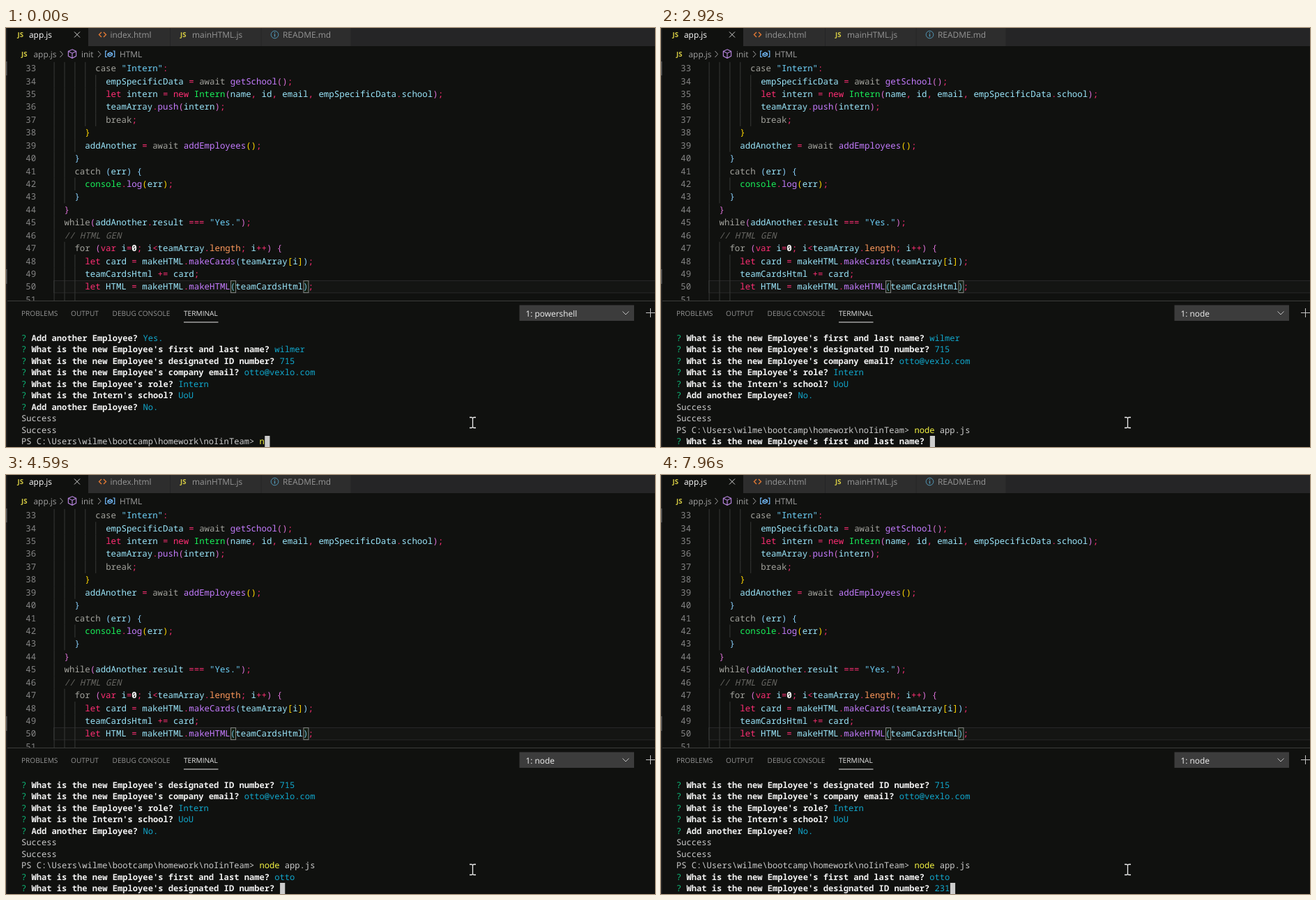
Animation of 931x601 px, one loop 8 s. Source, as an HTML page:

```html
<!DOCTYPE html>
<html lang="en">
<head>
<meta charset="utf-8">
<title>Editor and terminal</title>
<style>
html, body { margin: 0; width: 100%; height: 100%; overflow: hidden; background: #10110f; }
svg { display: block; }
text { white-space: pre; text-rendering: geometricPrecision; font-variant-ligatures: none; }
.code, .term { font-family: "Noto Sans Mono", "DejaVu Sans Mono", monospace; }
.code { font-size: 12.42px; }
.term { font-size: 12.127px; }
.ui { font-family: "Open Sans", "Noto Sans", sans-serif; font-size: 11.9px; }
.panel { font-size: 10.15px; }
.js { font: bold 9.6px "Open Sans", sans-serif; fill: #d5cb43; }
.line { fill: none; stroke-width: 1; }
</style>
</head>
<body>
<svg id="stage" width="931" height="601" viewBox="0 0 931 601">
  <rect width="931" height="601" fill="#10110f"/>

  <!-- tabs -->
  <rect x="118" width="813" height="26" fill="#252526"/>
  <path d="M118 0h117v26h-117zM236 0h129.500v26h-129.500zM366.500 0h128v26h-128z" fill="#2d2d2d"/>
  <path class="line" d="M98 5.500l8 8m0-8l-8 8" stroke="#d0d0d0"/>
  <path class="line" d="M137 6l-3.500 3.500 3.500 3.500m3-7l3.500 3.500-3.500 3.500" stroke="#e37933" style="stroke-width:1.4"/>
  <g fill="none" stroke="#519aba">
    <circle cx="385.500" cy="9.500" r="5.300"/>
    <path d="M385.500 8.500v4m0-6.500v1.300" stroke-width="1.400"/>
  </g>

  <!-- breadcrumbs -->
  <path class="line" d="M77.500 33l4 4.500-4 4.500M132 33l4 4.500-4 4.500" stroke="#a0a0a0"/>
  <path class="line" d="M95 30.800l5.600 2.700v6.800l-5.600 3-5.600-3v-6.800zM89.400 33.500l5.600 2.700 5.600-2.700M95 36.200v7" stroke="#b180d7" style="stroke-width:1.200"/>
  <path class="line" d="M145 33h-2.300v8.500h2.300M153.500 33h2.300v8.500h-2.300M146 37l3.500-2 3 1.300v2.500l-3.500 2-3-1.300zl3 1.300 3.500-2" stroke="#75beff" style="stroke-width:1.200"/>

  <g id="editor"></g>

  <!-- panel -->
  <rect y="391" width="931" height="210" fill="#10110f"/>
  <rect y="391" x="2" width="929" height="1" fill="#3c3d3b"/>
  <rect x="255" y="421.500" width="49.500" height="1" fill="#e7e7e7"/>
  <rect x="736.500" y="397.500" width="164.500" height="22.500" fill="#3c3c3c"/>
  <path class="line" d="M884.500 406.500l4.500 4.500 4.500-4.500" stroke="#c0c0c0"/>
  <path class="line" d="M918 408.500h13M924.500 402v13" stroke="#c5c5c5"/>

  <g id="labels"></g>
  <g id="terminal"></g>
  <rect id="cursor" y="585" width="7.200" height="16" fill="#cccccc"/>

  <!-- window edge -->
  <rect width="1.500" height="601" fill="#252526"/>
  <path d="M0 48h1.500v20h-1.500zM0 346h1.500v21h-1.500z" fill="#5a5a5a"/>

  <path class="line" d="M665 558.500h3l1.500 1 1.500-1h3M669.500 559.500v13M665 573.500h3l1.500-1 1.500 1h3" stroke="#f0f0f0" style="stroke-width:1.300"/>
</svg>
<script>
const $ = id => document.getElementById(id);
const LOOP = 8000;

function add(parent, tag, attrs, content = "") {
  const el = document.createElementNS("http://www.w3.org/2000/svg", tag);
  for (const key in attrs) el.setAttribute(key, attrs[key]);
  el.textContent = content;
  parent.append(el);
  return el;
}

// Marked text: pieces split by "|", the first letter of each names its style.
const pieces = marked => marked ? marked.split("|") : [];
const plain = marked => pieces(marked).map(p => p.slice(1)).join("");

function paint(el, marked, styles) {
  el.textContent = "";
  for (const p of pieces(marked)) add(el, "tspan", { style: styles[p[0]] }, p.slice(1));
}

// ---- editor ----
const CODE = { x: 68.6, w: 7.455, top: 48.8, pitch: 18.42, first: 33 };
const codeStyles = {
  k: "fill:#a3a39d", v: "fill:#9be6fb", p: "fill:#ff2e74", f: "fill:#c57cff",
  g: "fill:#19f05a", s: "fill:#6fd3fb", n: "fill:#fff;font-weight:bold",
  l: "fill:#ff9a5c", c: "fill:#666662;font-style:italic",
  Y: "fill:#ffd700", O: "fill:#da70d6", B: "fill:#87cefa"
};
const lines = [
  [8, 'kcase |s"Intern"|p:'],
  [10, "vempSpecificData|p = |kawait |fgetSchool|O()|p;"],
  [10, "plet |vintern|p = new |gIntern|O(|vname|p, |vid|p, |vemail|p, |vempSpecificData|p.|vschool|O)|p;"],
  [10, "vteamArray|p.|fpush|O(|vintern|O)|p;"],
  [10, "kbreak|p;"],
  [6, "Y}"],
  [6, "vaddAnother|p = |kawait |faddEmployees|Y()|p;"],
  [4, "B}"],
  [4, "kcatch |B(|verr|B) {"],
  [6, "gconsole|p.|flog|Y(|verr|Y)|p;"],
  [4, "B}"],
  [2, "O}"],
  [2, 'kwhile|O(|vaddAnother|p.|vresult|p === |s"Yes."|O)|p;'],
  [2, "c// HTML GEN"],
  [4, "kfor |O(|pvar |vi|p=|n0|p; |vi|p<|vteamArray|p.|llength|p; |vi|p++|O) {"],
  [6, "plet |vcard|p = |vmakeHTML|p.|fmakeCards|B(|vteamArray|Y[|vi|Y]|B)|p;"],
  [6, "vteamCardsHtml|p += |vcard|p;"],
  [6, "plet |vHTML|p = |vmakeHTML|p.|fmakeHTML|B(|vteamCardsHtml|B)|p;"],
  [6, ""]
];

function drawEditor() {
  const box = $("editor");
  const topOf = i => CODE.top + i * CODE.pitch;
  const current = topOf(50 - CODE.first);
  add(box, "rect", { x: 68, y: current, width: 863, height: 18.4, fill: "#282828" });
  add(box, "rect", { x: 69, y: current + 1, width: 862, height: 16.4, fill: "#141513" });
  lines.forEach(([indent, marked], i) => {
    const top = topOf(i), y = top + 13.4;
    for (let col = 0; col < indent; col += 2)
      add(box, "rect", { x: CODE.x + col * CODE.w, y: top, width: 1, height: CODE.pitch, fill: "#383937" });
    add(box, "text", { class: "code", x: 28.2, y, fill: "#858585" }, CODE.first + i);
    paint(add(box, "text", { class: "code", x: CODE.x + indent * CODE.w, y }), marked, codeStyles);
  });
  for (const col of [34, 48])
    add(box, "rect", { x: CODE.x + col * CODE.w + .5, y: current + .7, width: 7, height: 17,
      fill: "rgba(0,100,0,.1)", stroke: "#888" });
}

// ---- tab, breadcrumb and panel labels ----
const labels = [
  [16.5, 13, "JS", "js"], [33, 14, "app.js", "ui", "#fff"],
  [149.5, 14, "index.html", "ui", "#969696"],
  [250, 13, "JS", "js"], [267, 14, "mainHTML.js", "ui", "#969696"],
  [397, 14, "README.md", "ui", "#969696"],
  [22, 40.5, "JS", "js"], [39.5, 41.7, "app.js", "ui", "#a0a0a0"],
  [108, 41.7, "init", "ui", "#a0a0a0"], [163, 41.7, "HTML", "ui", "#a0a0a0"],
  [22, 413, "PROBLEMS", "ui panel", "#949494"], [93, 413, "OUTPUT", "ui panel", "#949494"],
  [152.5, 413, "DEBUG CONSOLE", "ui panel", "#949494"], [255, 413, "TERMINAL", "ui panel", "#e7e7e7"]
];
for (const [x, y, label, cls, fill = "#d5cb43"] of labels)
  add($("labels"), "text", { x, y, class: cls, fill }, label);
const shell = add($("labels"), "text", { x: 745.5, y: 413.6, class: "ui", fill: "#f0f0f0" });

// ---- terminal ----
const TERM = { x: 22, w: 7.276, base: 448.5, pitch: 16.5, rows: 10 };
const termStyles = {
  g: "fill:#0dbc79", b: "fill:#f2f2f2;font-weight:bold",
  c: "fill:#11a8cd", y: "fill:#f5f543", t: "fill:#cccccc"
};
const ask = (question, answer = "") => `g? |b${question} ` + (answer && "|" + answer);
const NAME = "What is the new Employee's first and last name?";
const ID = "What is the new Employee's designated ID number?";
const PROMPT = "tPS C:\\Users\\wilme\\bootcamp\\homework\\noIinTeam> |y";

const history = [
  ask("Add another Employee?", "cYes."),
  ask(NAME, "cwilmer"),
  ask(ID, "c715"),
  ask("What is the new Employee's company email?", "cotto@vexlo.com"),
  ask("What is the Employee's role?", "cIntern"),
  ask("What is the Intern's school?", "cUoU"),
  ask("Add another Employee?", "cNo."),
  "tSuccess",
  "tSuccess",
  PROMPT + "node|t app.js",
  ask(NAME, "cotto")
];

// time, lines scrolled, bottom line
const steps = [
  [0, 0, PROMPT + "n"],
  [60, 0, PROMPT + "nod"],
  [240, 0, PROMPT + "node"],
  [400, 0, PROMPT + "node|t "],
  [1190, 0, PROMPT + "node|t a"],
  [1350, 0, PROMPT + "node|t ap"],
  [1430, 0, PROMPT + "node|t app"],
  [1640, 0, PROMPT + "node|t app."],
  [1920, 0, PROMPT + "node|t app.j"],
  [2080, 0, PROMPT + "node|t app.js"],
  [2230, 1, ""],
  [2920, 1, ask(NAME)],
  [3490, 1, ""],
  [3560, 1, ask(NAME, "tot")],
  [3810, 1, ""],
  [3960, 1, ask(NAME, "totto")],
  [4440, 1, ask(NAME, "cotto")],
  [4510, 2, ""],
  [4590, 2, ask(ID)],
  [6640, 2, ""],
  [6710, 2, ask(ID, "t2")],
  [6960, 2, ""],
  [7030, 2, ask(ID, "t23")],
  [7100, 2, ask(ID, "t231")],
  [7960, 2, ask(ID, "c231")]
];
const NODE_AT = 2310;

const rows = Array.from({ length: TERM.rows }, (_, i) =>
  add($("terminal"), "text", { class: "term", x: TERM.x, y: TERM.base + i * TERM.pitch }));
let shown;

function render(t) {
  const name = t < NODE_AT ? "1: powershell" : "1: node";
  if (shell.textContent !== name) shell.textContent = name;
  const step = steps.findLast(s => s[0] <= t);
  if (step === shown) return;
  shown = step;
  const [, scroll, live] = step;
  const visible = [...history.slice(scroll, scroll + TERM.rows - 1), live];
  rows.forEach((row, i) => paint(row, visible[i], termStyles));
  $("cursor").setAttribute("x", TERM.x + plain(live).length * TERM.w);
}

drawEditor();
const start = performance.now();
function tick() {
  render((performance.now() - start) % LOOP);
  requestAnimationFrame(tick);
}
tick();
</script>
</body>
</html>
```
